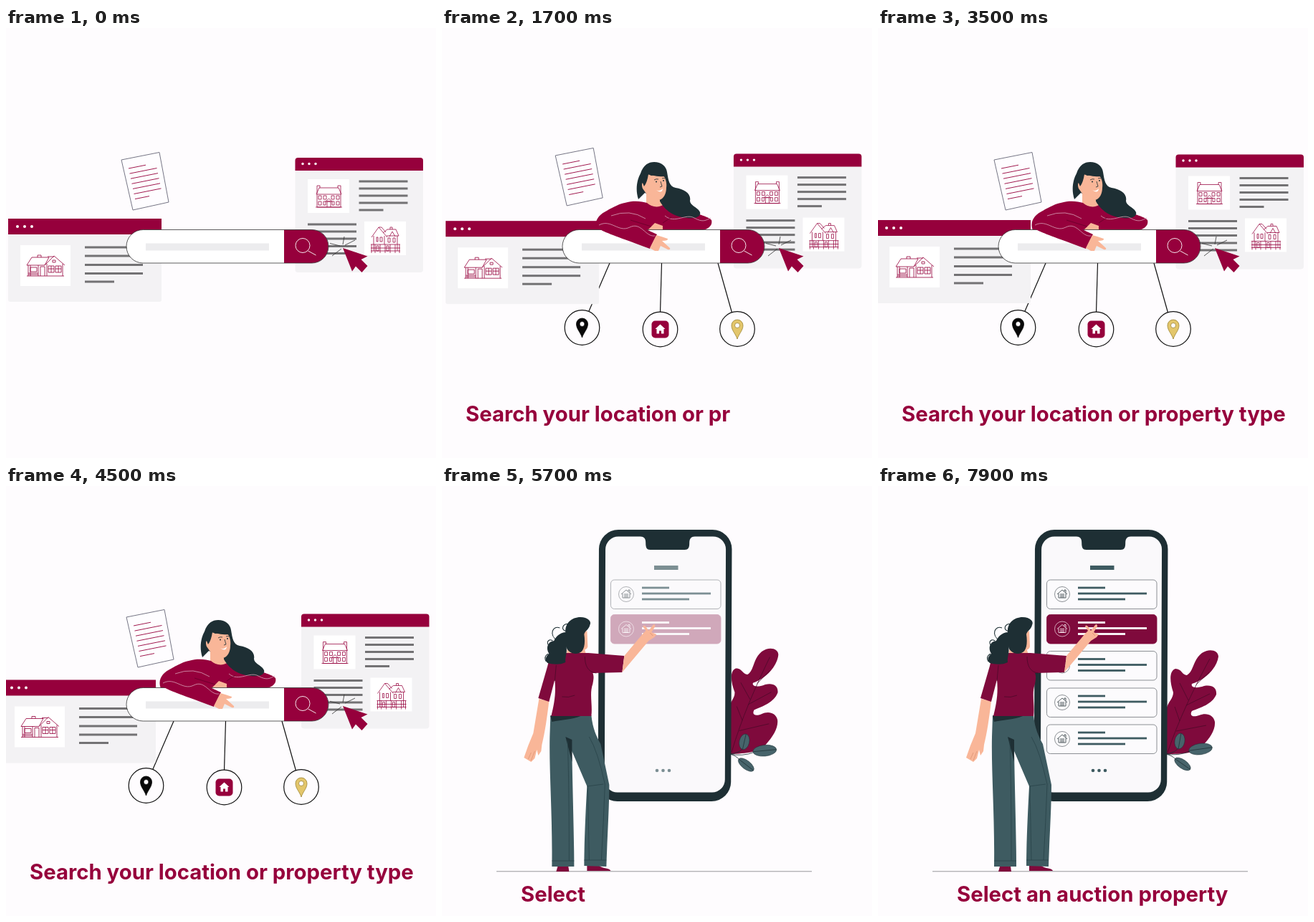
Recreate the animation shown at these times as an HTML page. Size 600 by 600 pixels, loop 8 s.

```html
<!DOCTYPE html>
<html lang="en">
<head>
<meta charset="utf-8">
<title>Property search</title>
<style>
  html, body { margin: 0; width: 100%; height: 100%; overflow: hidden; background: #fefcfe; }
  svg { display: block; width: 100vw; height: 100vh; }
  text { font: 700 29.3px Inter, "Open Sans", sans-serif; fill: #96003c; white-space: pre; }
</style>
</head>
<body>
<svg id="stage" viewBox="0 0 600 600"></svg>
<script>
const LOOP = 8000, STEP = 100, CUT = 4700;
const RED = '#96003c', WINE = '#7f0a3c', INK = '#1e2f34', TEAL = '#3e5b61', SKIN = '#f9b698', BG = '#fefcfe';
const CAPTION_1 = 'Search your location or property type';
const CAPTION_2 = 'Select an auction property';

const rect = (x, y, w, h, fill, extra = '') => `<rect x="${x}" y="${y}" width="${w}" height="${h}" fill="${fill}" ${extra}/>`;
const dot = (x, y, r, fill, extra = '') => `<circle cx="${x}" cy="${y}" r="${r}" fill="${fill}" ${extra}/>`;
const shape = (d, fill, extra = '') => `<path d="${d}" fill="${fill}" ${extra}/>`;
const line = (d, color, width, extra = '') =>
  `<path d="${d}" fill="none" stroke="${color}" stroke-width="${width}" stroke-linejoin="round" ${extra}/>`;
const group = (id, body, extra = '') => `<g id="${id}" ${extra}>${body}</g>`;
const textLines = (x, ys, w, lastW, color) =>
  ys.map((y, i) => rect(x, y - 1.5, i === ys.length - 1 ? lastW : w, 3, color)).join('');

/* Scene one */
const cottage = line(`M29 331L36 320H60L54 331ZM44 320V317H49V320M54 331L67 318L82 331M58 319H67
  M57 329V346M79 329V346M31 331V346M34 331V346M45 331V346M29 346H81M31 342H45M31 344H45
  M48 346V333H54V346M59 332H67V341H59ZM63 332V341M69 332H77V341H69ZM73 332V341
  M59 336H67M69 336H77M65 327V324H69V327ZM34 334H43V340H34Z`, RED, .8);

const manor = line(`M437 223H464L468 232H433ZM434 231V220H438V223M467 231V220H463V223
  M434 232V250H467V232M432 250H469M436 234H440V239H436ZM443 234H447V239H443ZM454 234H458V239H454Z
  M461 234H465V239H461ZM436 242H440V247H436ZM461 242H465V247H461ZM443 242H446V247H443ZM455 242H458V247H455Z
  M448 250V242H453V250M446 242L450.500 238L455 242Z`, RED, .75);

const villa = line(`M510 292L520 278L532 292M513 290V311M528 290V302M520 278H524L530 285
  M526 286L532 281H544L548 290H531M536 281V278H539V281M546 290V311M509 302H550M509 311H550
  M510 302V314M515 302V314M522 302V314M529 302V314M536 302V314M543 302V314M549 302V314
  M517 292H519V298H517ZM522 292H525V298H522ZM533 293H536V299H533ZM540 293H543V299H540Z
  M535 291L539 284L543 291M517 304H520V311H517ZM531 304H534V311H531ZM509 307H550`, RED, .75);

const leftWindow = rect(3, 266, 214, 116, '#f3f2f4', 'rx="3"') + rect(3, 266, 214, 22, RED) +
  [16, 26, 36].map(x => dot(x, 277, 2, '#fff')).join('') +
  rect(20, 303, 70, 57, '#fff') + cottage +
  textLines(110, [306, 318, 330.5, 342.5, 354], 81, 41, '#737274');

const rightWindow = rect(403.5, 181, 178.5, 160, '#f3f2f4', 'rx="4"') +
  shape('M403.500 199V185Q403.500 181 407.500 181H578Q582 181 582 185V199Z', RED) +
  [414, 423, 432].map(x => dot(x, 189.5, 1.7, '#fff')).join('') +
  rect(421, 211, 58, 47, '#fff') + manor + rect(500, 270, 58, 47, '#fff') + villa +
  textLines(492.5, [214, 224, 234, 244, 254], 68, 34, '#737274') +
  textLines(421, [274, 284, 294, 304.5, 314.5], 68, 68, '#737274');

const paperLines = Array.from({ length: 7 }, (_, i) => {
  const x = 171 + 1.5 * i, y = 196 + 7.1 * i, w = i === 0 ? 24 : i === 6 ? 20 : 38;
  return `M${x} ${y}l${w} ${-w * .2}`;
}).join('');
const paper = shape('M161 184L214 173.500L227 243L177 254Z', '#fefdff', 'stroke="#667" stroke-width=".9"') +
  line(paperLines, RED, .9);

const searchBar = shape('M191.500 281.500H388V328H191.500A23.250 23.250 0 0 1 191.500 281.500Z', '#fff') +
  rect(195, 300.5, 172, 10, '#ececee') +
  shape('M388 281.500H426.500A23.250 23.250 0 0 1 426.500 328H388Z', RED) +
  rect(168, 281.5, 282, 46.5, 'none', 'rx="23.2" stroke="#333" stroke-width=".8"') +
  line('M421.500 311L432.500 317', '#fff', .9) + dot(414, 303.5, 10, 'none', 'stroke="#fff" stroke-width=".9"');

const cursor = line('M472 291L470 302M487 296L473 303M452 300.500L466 304M455 318L468 308', '#333', .8) +
  shape('M470 307L504.500 318.500L495.500 323L504.500 332L496.500 341L488 332.500L483 339.500Z', RED);

const searcher = shape('M285 230H303L308 250Q296 258 285 246Z', SKIN) +
  shape(`M255 244C268 240 279 242 286 244C292 250 302 251 308 247L330 252C350 258 371 262 376 268
    C378 275 372 280 364 282H216C211 270 219 260 230 255C240 249 249 245 255 244Z`, RED) +
  shape('M287 282L297 272L308 276V282Z', SKIN) +
  shape(`M274 239C269 224 273 210 277 203C281 191 288 187 296 187C306 187 313 193 314 201
    C316 213 317 221 326 223C338 225 348 231 346 241C346 248 357 250 360 257C362 264 352 266 342 265
    C322 264 309 252 303 240L283 230Z`, INK) +
  shape('M282 212C281 206 287 202 292 206L307 204C312 208 314 216 313 223C313 231 309 239 303 240C297 241 291 238 287 234L280 224C278 219 279 214 283 215Z', SKIN) +
  shape('M286 230L304 240L304 247Q296 250 287 244Z', SKIN) +
  shape('M279 214C279 198 288 192 297 191C307 192 313 198 313 207C304 208 294 206 288 204C287 211 285 217 282 221Z', INK) +
  line('M296 212q3-2 6-1M307 210q2-1 4 0M305 214l2 7-3 1', INK, .8) +
  dot(299, 214.5, 1, INK) + dot(309, 213, 1, INK) + shape('M299 226Q304 229 308 224Q307 232 299 226Z', '#fff') +
  line('M311 262C325 274 340 258 352 265S369 268 375 265M236 262Q262 252 284 266', '#d9a5b9', .8) +
  line('M263 268L292 277M308 272L320 264', '#5d0026', .7);

const searcherArm = shape('M215 276C218 283 240 289 290 308L300 288C286 282 268 271 246 264L218 268Z', RED) +
  line('M219 275C236 266 246 286 262 278S284 292 297 290', '#d9a5b9', .8) +
  shape('M299 289L306 291L315 294Q316 297 307 297L318 307Q319 310 315 309L305 304L302 311L297 311L290 307Z', SKIN);

const pin = (fill, edge) =>
  shape('M0 14C-2 7-8 2-8-5A8 8 0 0 1 8-5C8 2 2 7 0 14Z', fill, `stroke="${edge}" stroke-width=".8"`) +
  dot(0, -5, 3.5, BG, `stroke="${edge}" stroke-width=".8"`);
const badges = [
  { x: 195.5, y: 418, link: 'M234 328L205 395', icon: pin('#080808', '#080808') },
  { x: 304.5, y: 420.5, link: 'M306.500 328L304.500 397', icon:
    rect(-12, -12, 24, 24, RED, 'rx="5"') + shape('M0-7L7-.5H5V6H1.500V2H-1.500V6H-5V-.5H-7Z', '#fff') },
  { x: 412, y: 420, link: 'M385 328L404.500 397', icon: pin('#e3c66b', '#9c8434') },
];
const badgeLinks = badges.map(b => line(b.link, '#111', 1.2, 'pathLength="1" stroke-dasharray="1 2" class="link"')).join('');
const badgeRings = badges.map(b => `<g transform="translate(${b.x} ${b.y})">` +
  dot(0, 0, 24.3, BG, 'stroke="#111" stroke-width="1.2"') + `<g class="icon">${b.icon}</g></g>`).join('');

const sceneOne = group('links', badgeLinks) + group('leftWindow', leftWindow) + group('rightWindow', rightWindow) +
  group('paper', paper) + group('rings', badgeRings) + group('searcher', searcher) + searchBar +
  group('searcherArm', searcherArm) + cursor + '<text id="caption1" x="33" y="549"></text>';

/* Scene two */
const bigLeaf = shape(`M402 374C425 374 444 373 453 362C463 352 471 340 470 329C468 319 458 316 448 320
    C440 323 434 321 438 314C450 309 466 305 472 291C473 281 466 277 455 279C444 283 436 281 438 276
    C456 271 473 254 475 238C475 229 462 226 452 233C439 243 441 258 431 264C424 264 424 255 415 255
    C406 258 407 273 412 288C412 297 405 300 402 312Z`, WINE) +
  line('M404 372C420 325 440 284 463 241M421 328L414 308M433 299L421 275M430 306L463 290M416 342L458 334M444 277L462 260', '#4c0a29', .8);

const leaf = (x, y, rx, ry, angle) =>
  `<g transform="translate(${x} ${y}) rotate(${angle})"><ellipse rx="${rx}" ry="${ry}" fill="#47646b" stroke="${INK}" stroke-width=".5"/>` +
  line(`M${-rx} 0H${rx}`, INK, .7) + '</g>';
const smallLeaves = line('M400 374Q417 373 421 362M400 374Q420 377 435 370M400 374Q410 375 416 382', INK, .8) +
  leaf(421, 356, 11, 7, -80) + leaf(450, 367, 16.5, 7.8, -8) + leaf(425, 388, 13, 6, 35);

const phone = rect(219.3, 61, 185.5, 379, INK, 'rx="27"') + rect(228.4, 70.5, 168, 357, '#faf9fb', 'rx="18"') +
  shape('M277 70C283 71 284.500 74 284.500 79C284.500 86 286 89 291 89H339C344 89 345.500 86 345.500 80C345.500 74 347 71 353 70Z', INK);

const card = (y, i) => {
  const active = i === 1, cy = y + 20, color = active ? '#fff' : TEAL;
  return `<g class="card">` +
    rect(235.5, y, 153.5, 40.5, active ? WINE : '#fcfbfd', `rx="5" stroke="${active ? WINE : '#70757a'}" stroke-width=".8"`) +
    dot(257, cy, 10.5, 'none', `stroke="${active ? '#e5c8d4' : '#70757a'}" stroke-width=".8"`) +
    line(`M250 ${cy}l7-6l7 6M252 ${cy - 1}v6h10v-6M254 ${cy}h6M254 ${cy + 2}h6M254 ${cy + 4}h6M260 ${cy - 4}v-2h2v4`, active ? '#e5c8d4' : '#555f63', 1) +
    [[38, -9], [96, -1], [66, 7]].map(([w, dy]) => rect(279, cy + dy - 1.4, w, 2.8, color)).join('') + '</g>';
};
const cards = [131, 179.5, 230.5, 282, 333].map(card).join('');
const phoneExtras = rect(296, 111, 33.5, 6, TEAL) + [300, 308.5, 317].map(x => dot(x, 397, 2.3, TEAL)).join('');

const pointer = shape('M144 297L158 300C155 325 152 345 148 361L147 370L143 376L141 368L138 380L133 385L128 382L123 379L129 362L136 345Z', SKIN) +
  line('M133 372L129 381M138 370L133 383', '#c9805f', .5) +
  shape('M170 531H185L186 538H168Z', WINE) + shape('M211 530H228C233 534 243 533 244 537H211Z', WINE) +
  shape(`M160 320H217C219 339 224 349 230 360L242 417C242 450 239 495 238 531L207 530
    C207 500 209 455 211 419L190 370C191 430 193 490 193 531L162 531C163 460 158 400 159 350Z`, TEAL) +
  shape('M181 350L190 354L190 385Z', INK) + shape('M160 321H202C190 326 176 326 162 329Z', INK) +
  line('M162 523H193M207 522H238M184 355Q186 420 186 523M211 419L234 416M214 350Q226 370 236 416Q234 470 231 522M212 419L214 522', '#263f45', .7) +
  shape('M184 222H206L210 236L182 238Z', SKIN) +
  shape('M204 206L211 202L212 224Q211 230 201 229Z', SKIN) +
  shape(`M172 233C164 235 158 240 156 251L143 296L158 301L166 270C168 290 165 305 161 321H217
    C219 305 214 290 219 276C220 270 221 266 219 261L260 260L263 237L213 233Z`, WINE) +
  line('M208 238C208 250 212 260 224 261M176 294Q185 296 194 292M166 272L168 250', '#4c0a29', .8) +
  shape('M263 237L289 206L293 202L289 196Q290 193 293 196L297 202L303 194Q306 191 306 196L301 204L308 207L305 211L297 216L260 260Z', SKIN) +
  line('M299 205L303 209', '#c9805f', .6) +
  shape(`M181 204C180 192 189 183 202 183C212 183 218 189 215 194C214 200 208 202 207 207
    C209 220 207 231 200 233C192 236 183 231 182 224C184 232 180 239 181 246C173 250 163 249 156 247
    C151 243 154 237 158 234C153 226 156 217 165 216C167 211 172 205 181 204Z`, INK) +
  line('M184 203C172 202 178 190 185 193M170 216C157 208 163 194 173 198M159 224C153 219 157 212 163 216M157 234Q150 238 154 245', INK, 1.1);

const sceneTwo = group('bigLeaf', bigLeaf) + group('smallLeaves', smallLeaves) +
  `<g transform="skewX(-.22)">${phone}</g>` + cards + group('phoneExtras', phoneExtras) +
  line('M76 537.800H516', '#8b8b8f', .9) + group('pointer', pointer) +
  '<text id="caption2" x="110" y="580"></text>';

const stage = document.getElementById('stage');
stage.innerHTML = group('sceneOne', sceneOne) + group('sceneTwo', sceneTwo);
const el = id => document.getElementById(id);
const all = name => [...stage.querySelectorAll('.' + name)];
const links = all('link'), icons = all('icon'), cardNodes = all('card');

/* Motion */
const clamp = v => Math.max(0, Math.min(1, v));
const progress = (t, start, length) => clamp((t - start) / length);
const easeOut = u => 1 - (1 - u) ** 2;
const typed = (text, t, start, perChar) => text.slice(0, Math.max(0, Math.floor((t - start) / perChar)));

const KEY_TIMES = [0, 900, 1800, 2500, 3500, 4500];
function drift(t, values) {
  const last = KEY_TIMES.length - 1;
  let i = 0;
  while (i < last - 1 && t >= KEY_TIMES[i + 1]) i++;
  const slope = k => {
    const a = Math.max(0, k - 1), b = Math.min(last, k + 1);
    return (values[b] - values[a]) / (KEY_TIMES[b] - KEY_TIMES[a]);
  };
  const h = KEY_TIMES[i + 1] - KEY_TIMES[i], u = (t - KEY_TIMES[i]) / h;
  return (1 + 2 * u) * (1 - u) ** 2 * values[i] + u * (1 - u) ** 2 * h * slope(i) +
    u * u * (3 - 2 * u) * values[i + 1] + u * u * (u - 1) * h * slope(i + 1);
}
const floaters = {
  leftWindow: [[0, 2, 2, 0, -4, -8], [0, 4, 3, 1, 2, 4.5]],
  rightWindow: [[0, -1, 4, 7.5, 12, 8.5], [0, -4, -5.5, -6, -4.5, -2.5]],
  paper: [[0, -1, -3, -3.5, 1, 7], [0, -4, -6, -2.5, 0, -1]],
};

function drawSearch(t) {
  for (const [id, [xs, ys]] of Object.entries(floaters))
    el(id).setAttribute('transform', `translate(${drift(t, xs)} ${drift(t, ys)})`);
  const shown = progress(t, 0, 500);
  el('searcher').setAttribute('opacity', shown);
  el('searcherArm').setAttribute('opacity', shown);
  const drawn = progress(t, 200, 500);
  links.forEach(n => {
    n.setAttribute('stroke-dashoffset', 1 - drawn);
    n.setAttribute('opacity', drawn > 0 ? 1 : 0);
  });
  el('rings').setAttribute('opacity', progress(t, 300, 400));
  icons.forEach(n => n.setAttribute('transform', `scale(${progress(t, 600, 510)})`));
  el('caption1').textContent = typed(CAPTION_1, t, 0, 64);
}

function drawSelect(t) {
  const sway = Math.cos((t - 5100) / 2400 * 2 * Math.PI) - .5;
  el('bigLeaf').setAttribute('transform', `rotate(${4.72 * sway} 403 374)`);
  el('smallLeaves').setAttribute('transform', `rotate(${-5.3 * sway} 403 374)`);
  el('pointer').setAttribute('transform', `translate(${-361 * (1 - easeOut(progress(t, CUT, 1183)))} 0)`);
  cardNodes.forEach((n, i) => n.setAttribute('opacity', progress(t, 5500 + 100 * i, 300)));
  el('phoneExtras').setAttribute('opacity', progress(t, 5500, 300));
  el('caption2').textContent = typed(CAPTION_2, t, 4975, 92);
}

const began = performance.now();
function frame() {
  const t = Math.floor((performance.now() - began) % LOOP / STEP) * STEP;
  const first = t < CUT;
  el('sceneOne').style.display = first ? '' : 'none';
  el('sceneTwo').style.display = first ? 'none' : '';
  (first ? drawSearch : drawSelect)(t);
  requestAnimationFrame(frame);
}
frame();
</script>
</body>
</html>
```
